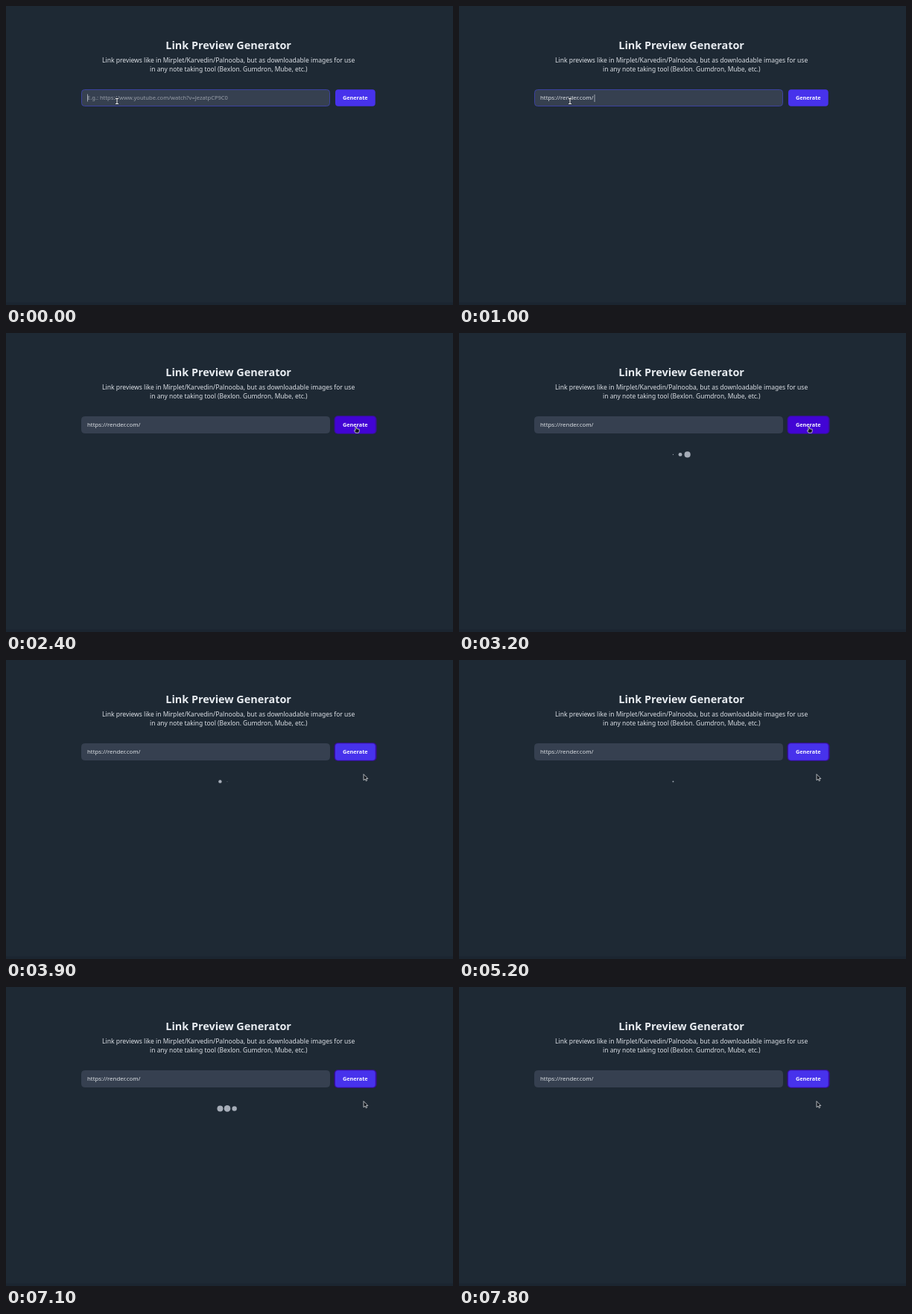
Animation of 600x402 px, one loop 8 s. Source, as an HTML page with a canvas:

```html
<!DOCTYPE html>
<html lang="en">
<head>
<meta charset="utf-8">
<title>Link Preview Generator</title>
<style>
html, body { margin: 0; width: 100%; height: 100%; overflow: hidden; background: #1e2934; }
canvas { display: block; width: 600px; height: 402px; }
</style>
</head>
<body>
<canvas id="stage"></canvas>
<script>
const LOOP = 8000, STEP = 100;
const FONT = '"Noto Sans", "Open Sans", sans-serif';
const PASTE = 900, MOVE = 1400, CLICK = 2400, LOAD = 2540, LEAVE = 3250;

const canvas = document.getElementById('stage');
const ctx = canvas.getContext('2d');
const dpr = window.devicePixelRatio || 1;
canvas.width = 600 * dpr;
canvas.height = 402 * dpr;
ctx.scale(dpr, dpr);

const clamp = v => Math.max(0, Math.min(1, v));
const lerp = (a, b, k) => a + (b - a) * k;
const easeCubic = u => u < 0.5 ? 4 * u ** 3 : 1 - 4 * (1 - u) ** 3;

// CSS ease-in-out: cubic-bezier(.42, 0, .58, 1)
function easeInOut(x) {
  let lo = 0, hi = 1, s = 0.5;
  for (let i = 0; i < 20; i++) {
    s = (lo + hi) / 2;
    const bx = 1.26 * s * (1 - s) ** 2 + 1.74 * s * s * (1 - s) + s ** 3;
    if (bx < x) lo = s; else hi = s;
  }
  return s * s * (3 - 2 * s);
}

function text(str, x, y, size, color, weight = 400, align = 'center') {
  ctx.font = `${weight} ${size}px ${FONT}`;
  ctx.textAlign = align;
  ctx.fillStyle = color;
  ctx.fillText(str, x, y);
}

function box(x, y, w, h, r, fill, stroke) {
  ctx.beginPath();
  ctx.roundRect(x, y, w, h, r);
  ctx.fillStyle = fill;
  ctx.fill();
  if (!stroke) return;
  ctx.strokeStyle = stroke;
  ctx.lineWidth = 1;
  ctx.stroke();
}

function header() {
  text('Link Preview Generator', 298.6, 58.2, 14.4, '#e8ecf1', 600);
  text('Link previews like in Mirplet/Karvedin/Palnooba, but as downloadable images for use',
    298.6, 76.1, 8.52, '#dce0e6');
  text('in any note taking tool (Bexlon. Gumdron, Mube, etc.)', 298.8, 88.4, 8.45, '#dce0e6');
}

function field(t) {
  box(101.5, 112.5, 333, 22, 4, '#364050', t < CLICK ? '#3c429f' : '#364050');
  if (t < PASTE) {
    text('E.g.: https://www.youtube.com/watch?v=JezatpCP9C0', 109, 126, 7.57, '#989ea8', 400, 'left');
  } else {
    text('https://render.com/', 109, 126, 7.85, '#dce0e5', 400, 'left');
  }
  ctx.fillStyle = '#b9bec7';
  if (t < 600) ctx.fillRect(109, 118.5, 0.8, 10);
  if (t >= 1000 && t < 1500) ctx.fillRect(181.6, 119, 0.8, 10);
}

function button(t) {
  const hover = clamp((t - 1900) / 200) * (1 - clamp((t - 3500) / 200));
  const mix = (a, b) => Math.round(lerp(a, b, hover));
  if (t >= CLICK) box(440.5, 111.3, 57, 24.5, 5, '#380da0');
  box(442, 112.3, 53.7, 22.4, 4, `rgb(${mix(71, 66)},${mix(50, 4)},${mix(236, 212)})`);
  text('Generate', 468.8, 126.1, 7.3, '#f5f6ff', 600);
}

function loader(t) {
  if (t < LOAD) return;
  ctx.fillStyle = '#a6adb8';
  for (let i = 0; i < 3; i++) {
    const age = (t - LOAD + 320 - i * 160) % 1400;
    const scale = easeInOut(clamp(1 - Math.abs(age - 560) / 560));
    if (scale < 0.06) continue;
    ctx.beginPath();
    ctx.arc(287.4 + i * 9.6, 163.4, 4.4 * scale, 0, Math.PI * 2);
    ctx.fill();
  }
}

const ARROW = new Path2D('M0 0V8.2L2 6.5L3.3 9.2L4.6 8.6L3.4 6H5.8Z');
const HAND = new Path2D('M-1 0H.6V2.6L4.2 3.2V6L3.4 8H-.8L-2.6 5L-2 4.2L-1 5Z');
const BEAM = new Path2D('M-2-3.5H2M0-3.5V3.5M-2 3.5H2');

function pointer(t) {
  const over = easeCubic(clamp((t - MOVE) / 670));
  const away = easeCubic(clamp((t - LEAVE) / 500));
  const x = lerp(lerp(149, 470, over), 480, away);
  const y = lerp(lerp(128, 126.2, over), 153.5, away);
  ctx.save();
  ctx.translate(x, y);
  ctx.lineJoin = 'round';
  if (x < 435) {
    ctx.strokeStyle = '#1a2029';
    ctx.lineWidth = 2.2;
    ctx.stroke(BEAM);
    ctx.strokeStyle = '#f4f5f7';
    ctx.lineWidth = 1.1;
    ctx.stroke(BEAM);
  } else {
    const shape = x > 442 && y < 135 ? HAND : ARROW;
    ctx.fillStyle = '#11151b';
    ctx.fill(shape);
    ctx.strokeStyle = '#d9dce0';
    ctx.lineWidth = 0.8;
    ctx.stroke(shape);
  }
  ctx.restore();
}

function draw(t) {
  ctx.fillStyle = '#1e2934';
  ctx.fillRect(0, 0, 600, 402);
  ctx.fillStyle = '#1b2530';
  ctx.fillRect(0, 398.5, 600, 3.5);
  header();
  field(t);
  button(t);
  loader(t);
  pointer(t);
}

const start = performance.now();
function tick() {
  const t = (performance.now() - start) % LOOP;
  draw(Math.floor(t / STEP) * STEP);
  requestAnimationFrame(tick);
}
tick();
</script>
</body>
</html>
```
